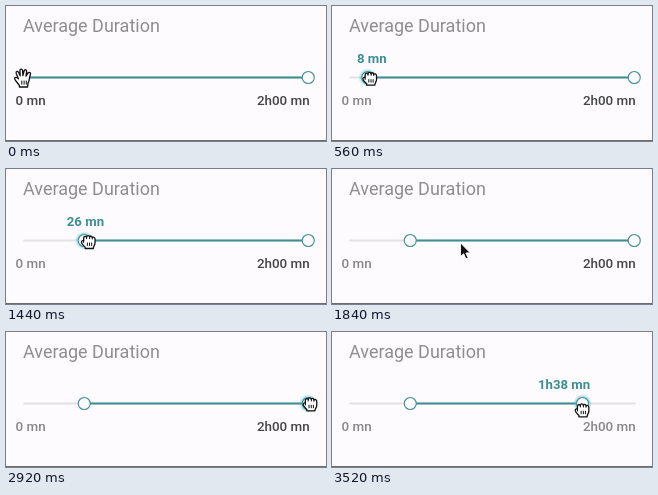
These frames come from a looping animation (320 px wide and 135 px high, 3560 ms). An HTML page:

```html
<!DOCTYPE html>
<html lang="en">
<head>
<meta charset="utf-8">
<title>Average Duration</title>
<style>
  html, body { margin: 0; height: 100%; overflow: hidden; background: #fdfbfe; }
  svg { display: block; width: 100vw; height: 100vh; }
  text { font: 500 13.4px Roboto, sans-serif; fill: #868686; }
  .title { font: 400 18px Roboto, sans-serif; fill: #8e8e8e; }
  .bubble { font-weight: 700; font-size: 13.2px; fill: #3d8f94; }
  .knob { fill: #fdfbfe; stroke: #3d8f94; stroke-width: 1.1; }
  .glow { fill: #4cc3cb; }
  .hand { fill: #fff; stroke: #111; stroke-width: 1.3; stroke-linejoin: round; stroke-linecap: round; }
  .arrow { fill: #111; stroke: #fff; }
</style>
</head>
<body>
<svg viewBox="0 0 320 135">
  <defs>
    <g id="knob">
      <circle class="glow" r="9" opacity=".18"/>
      <circle class="glow" r="7.8" opacity=".3"/>
    </g>
  </defs>
  <text class="title" x="17" y="26.3">Average Duration</text>
  <rect x="17.5" y="70.5" width="286" height="2" fill="#e2e1e3"/>
  <rect id="range" y="70.5" height="2" fill="#3d8f94"/>
  <text id="minLabel" x="9.6" y="99">0 mn</text>
  <text id="maxLabel" x="250.9" y="99">2h00 mn</text>
  <g id="left"><use href="#knob"/><circle class="knob" r="6"/></g>
  <g id="right"><use href="#knob"/><circle class="knob" r="6"/></g>
  <text id="bubble" class="bubble" y="57"></text>
  <rect y="134" width="320" height="1" fill="#6c6c6c"/>
  <g id="cursor">
    <g id="open" class="hand">
      <path d="M-3.4 9V7.6C-5 5-8.2 2.2-8.2.6C-8.2-1-6-1.2-4.4.8L-6.6-4.6C-7.2-6.7-4.9-7.4-4.1-5.4L-2.6-2.2L-2.9-7.4C-2.9-9.4-.4-9.4-.2-7.4L.1-2.4L1.3-7C1.8-9 4.1-8.4 3.8-6.4L3.2-1.8L5.2-4.8C6.3-6.4 8.4-5.2 7.6-3.4C6.4-.4 6.6 3 5.2 5.4L4.8 9Z"/>
      <path d="M-1 3V6.2M1.3 3V6.2M3.5 3V6.2" stroke-width="1"/>
    </g>
    <g id="closed" class="hand">
      <path d="M-3.1 6.8V5.4C-4.6 3.8-6.8 2.4-6.8.6C-6.8-1-5.6-1.4-4.6-.8V-3.4C-4.6-5.6-2.1-6-1.7-4.4C-1.4-6.6 1-6.6 1.4-4.6C1.8-6.2 3.8-6 4-4C4.8-5 6.8-4.6 6.8-2.6V1.4C6.8 3.2 5.2 4.2 5 6.8Z"/>
      <path d="M-4.6-.8V1M-1.7-4.4V-3M1.4-4.6V-3M4-4V-2.7M-.9 1.2V3.8M1.3 1.2V3.8M3.4 1.2V3.8" stroke-width="1"/>
    </g>
    <path id="arrow" class="arrow" d="M0 0V14L3.2 11L5.5 16.2L7.8 15.2L5.5 10.2H10Z"/>
  </g>
</svg>
<script>
const LOOP = 3560, STEP = 40;
const PRESS_LOW = 80, DRAG_LOW = 240, RELEASE = 1720, EXIT = 2160, RETURN = 2360, PRESS_HIGH = 2920;
const $ = id => document.getElementById(id);

const ramp = (t, from, to) => Math.min(1, Math.max(0, (t - from) / (to - from)));
const easeOut = f => Math.sin(f * Math.PI / 2);
const knobX = minutes => 17.5 + minutes * 2.373;
const show = (el, on) => el.setAttribute('visibility', on ? 'visible' : 'hidden');
const move = (el, x, y) => el.setAttribute('transform', `translate(${x} ${y})`);

// The low end is dragged in two pulls, the high end in one
const lowAt = t => 17.8 * ramp(t, DRAG_LOW, 800) ** 1.5 + 7.8 * easeOut(ramp(t, 800, 1440));
const highAt = t => 120 - 21.8 * ramp(t, PRESS_HIGH, 3520);

function cursorAt(t, x1, x2) {
  if (t < RETURN) {
    const travel = ramp(t, RELEASE, EXIT);
    return [x1 - .7 + 4.7 * ramp(t, DRAG_LOW, 800) + 250 * travel ** 1.3,
            72 + ramp(t, DRAG_LOW, 800) * .7 + 4 * travel];
  }
  const back = ramp(t, RETURN, 2640), pull = ramp(t, PRESS_HIGH, 3520);
  return [x2 + 1.7 + 18 * (1 - back) - 2.2 * pull, 78 - 6 * back + 6 * pull];
}

function format(minutes) {
  const m = Math.round(minutes), h = Math.floor(m / 60);
  return (h ? h + 'h' + String(m % 60).padStart(2, '0') : m) + ' mn';
}

function setKnob(el, x, glow) {
  move(el, x, 71.5);
  el.firstElementChild.setAttribute('opacity', glow);
}

function draw(t) {
  const low = lowAt(t), high = highAt(t);
  const x1 = knobX(low), x2 = knobX(high);
  const [x, y] = cursorAt(t, x1, x2);
  const dragLow = t >= PRESS_LOW && t < RELEASE, dragHigh = t >= PRESS_HIGH;

  setKnob($('left'), x1, dragLow ? ramp(t, 40, 120) : 0);
  setKnob($('right'), x2, dragHigh ? 1 : 0);
  $('range').setAttribute('x', x1);
  $('range').setAttribute('width', x2 - x1);
  $('minLabel').style.fill = low > 0 ? '' : '#444';
  $('maxLabel').style.fill = high < 120 ? '' : '#444';

  const value = dragHigh ? high : low;
  $('bubble').textContent = format(value);
  $('bubble').setAttribute('x', 9.6 + 2 * value);
  show($('bubble'), dragLow && low > 0 || dragHigh && high < 120);

  const closed = dragLow || dragHigh;
  const near = Math.min(Math.abs(x - x1), Math.abs(x - x2)) < 9;
  move($('cursor'), x, y);
  show($('closed'), closed);
  show($('open'), !closed && near);
  show($('arrow'), !closed && !near);
}

const start = performance.now();
function tick() {
  const t = (performance.now() - start) % LOOP;
  draw(Math.floor(t / STEP) * STEP);
  requestAnimationFrame(tick);
}
tick();
</script>
</body>
</html>
```
